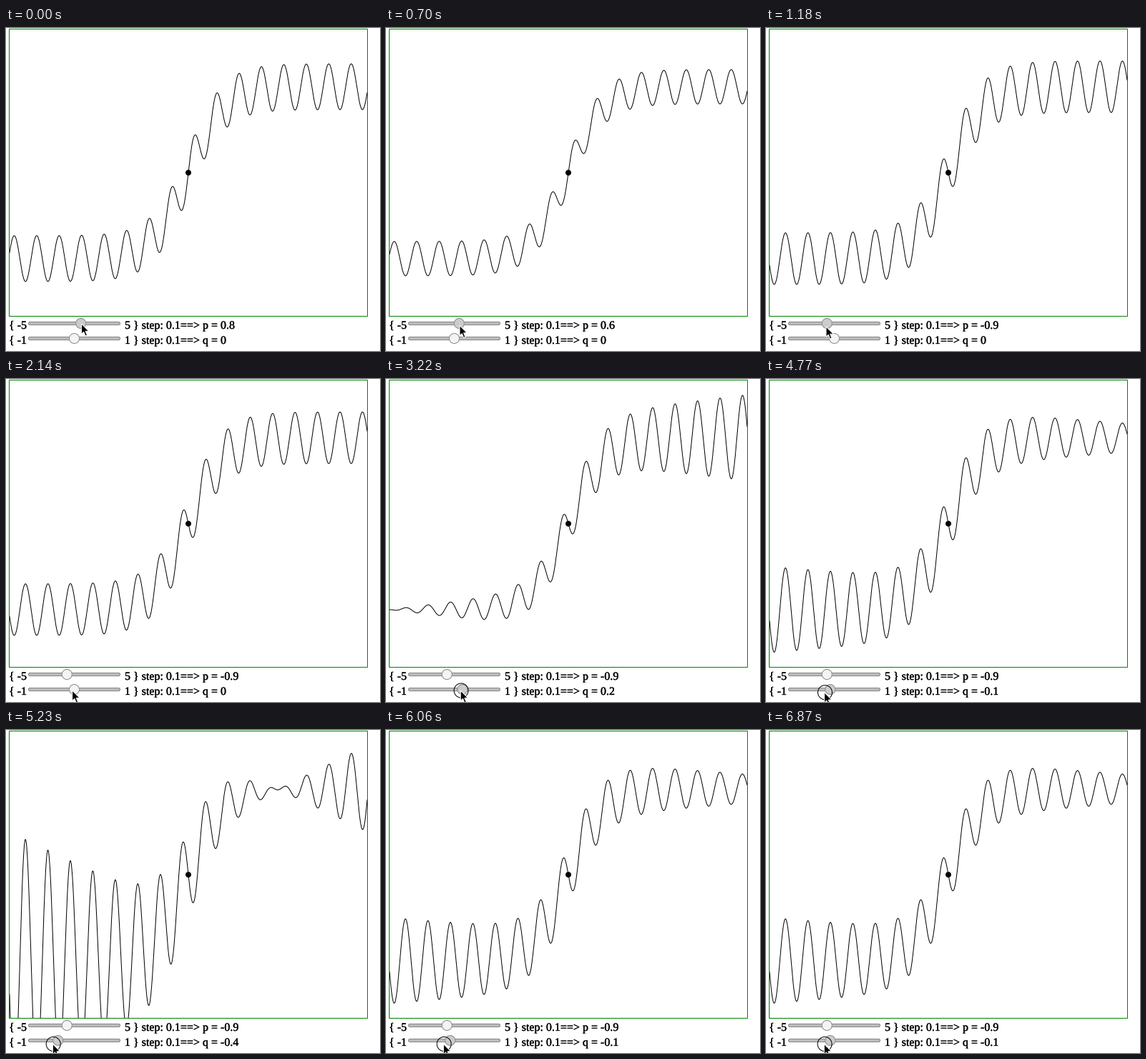
A matplotlib script that plays this animation: 523 by 451 pixels, repeating every 6970 ms.

```python
import numpy as np
import matplotlib.pyplot as plt
from matplotlib.animation import FuncAnimation
from matplotlib.patches import Circle, FancyBboxPatch, Polygon, Rectangle
from matplotlib.patheffects import withStroke

W, H, DPI = 523, 451, 64
PX = 72 / DPI  # points per pixel
FRAMES, INTERVAL = 170, 41
TICK = FRAMES * INTERVAL / 59  # the picture is refreshed once per tick
P_DONE, GRAB = 1600, 2700  # ms: first slider released, second one held
LEAD = 90  # ms the pointer runs ahead of the dragged knob

plt.rcParams["font.family"] = "Liberation Serif"

# turning points of the two drags: time in ms, value
P_TURNS = [(0, 0.8), (118, 1.1), (400, 1.1), (1180, -0.9)]
Q_TURNS = [(2570, 0), (3490, 0.3), (5320, -0.5), (5790, 0.1),
           (6170, -0.3), (6490, 0.1), (6940, -0.2)]

ARROW = np.array([(0, 0), (0, 14.3), (3.2, 11.3), (5.6, 17), (8, 16),
                  (5.6, 10.4), (10.2, 10.2)])
X = np.linspace(-5, 5, 1001)
IDLE, PRESSED = "#f4f4f4", "#cccccc"


def drag(t, turns):
    """Value at time t, speeding up from each turning point to the next."""
    if t <= turns[0][0]:
        return turns[0][1]
    for (t0, a), (t1, b) in zip(turns, turns[1:]):
        if t < t1:
            return a + (b - a) * ((t - t0) / (t1 - t0)) ** 1.5
    return turns[-1][1]


def pointer(t):
    glide = np.clip((t - 1540) / 580, 0, 1)
    on_p = 95.4 + 12.65 * drag(t, P_TURNS)
    on_q = 92.7 + 57 * drag(t + LEAD, Q_TURNS)
    sink = 4 * min(t / 1180, 1) + 3.5 * np.clip((t - 3200) / 2000, 0, 1)
    return on_p + (on_q - on_p) * glide, 413 + sink + 18 * glide


def wave(p, q):
    return 3 * np.tanh(X) + p * np.sin(10 * X) * (1 + q * X) / (1 + q)


fig = plt.figure(figsize=(W / DPI, H / DPI), dpi=DPI, facecolor="white")
ax = fig.add_axes([0, 0, 1, 1])
ax.set_xlim(0, W)
ax.set_ylim(H, 0)
ax.axis("off")


class Slider:
    """A labelled range input with its value readout."""

    def __init__(self, name, limit, y):
        self.name, self.limit, self.y = name, limit, y
        self.write(4, f"{{ -{limit}")
        self.label = self.write(166, "")
        ax.add_patch(FancyBboxPatch(
            (33.5, y - 0.1), 124, 0.2, boxstyle="round,pad=2,rounding_size=2",
            fc="#bcbcbc", ec="#858585", lw=PX, zorder=2))
        self.knob = ax.add_patch(Circle((95.5, y), 7, ec="#8c8c8c",
                                        lw=PX, zorder=3))

    def write(self, x, text):
        heft = withStroke(linewidth=0.3 * PX, foreground="black")
        return ax.text(x, self.y + 7.5, text, fontsize=16 * PX,
                       va="baseline", ha="left", color="black",
                       path_effects=[heft])

    def show(self, value, pressed):
        value = round(value, 1) + 0.0
        self.label.set_text(
            f"{self.limit} }} step: 0.1==> {self.name} = {value:g}")
        self.knob.center = (95.5 + 57 * value / self.limit, self.y)
        self.knob.set_facecolor(PRESSED if pressed else IDLE)
        return value


view = Rectangle((5, 2), 500, 400, transform=ax.transData)
curve, = ax.plot([], [], color="black", lw=PX, zorder=2)
curve.set_clip_path(view)
ax.add_patch(Rectangle((4.5, 1.5), 501, 401, fill=False, ec="green",
                       lw=PX, snap=False, zorder=3))
ax.add_patch(Circle((255, 202), 4, fc="black", lw=0, zorder=4))

p_slider = Slider("p", 5, 412.5)
q_slider = Slider("q", 1, 433.5)

ring = ax.add_patch(Circle((0, 0), 10, fill=False, ec="black", lw=PX,
                           zorder=5))
arrow = ax.add_patch(Polygon(ARROW, fc="black", ec="white", lw=PX, zorder=6))


def update(i):
    now = (i + 1) * INTERVAL - 1
    t = now // TICK * TICK
    p = p_slider.show(drag(t, P_TURNS), t < P_DONE)
    q = q_slider.show(drag(t, Q_TURNS), t >= GRAB)
    curve.set_data(255 + 50 * X, 202 - 40 * wave(p, q))
    cx, cy = pointer(t)
    ring.center = (cx + 0.8, cy)
    ring.set_visible(t >= GRAB)
    arrow.set_xy(ARROW + (cx, cy))
    return curve, ring, arrow


anim = FuncAnimation(fig, update, frames=FRAMES, interval=INTERVAL,
                     init_func=lambda: update(0), repeat=True,
                     repeat_delay=0, blit=False)
plt.show()
```
